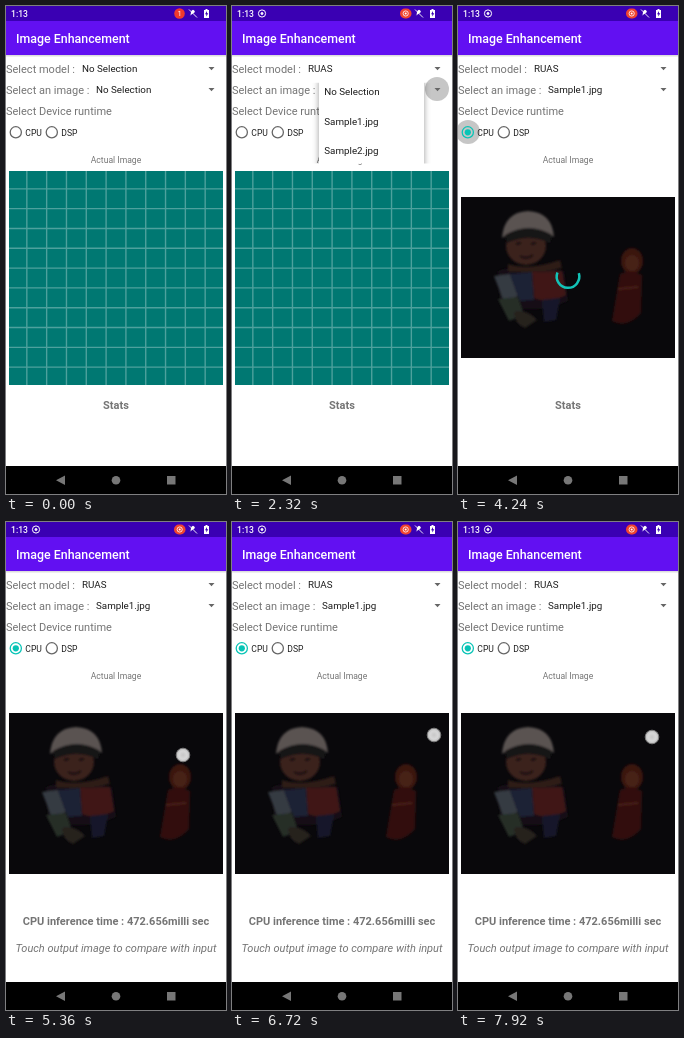
An HTML page that plays this animation: 220x488 px, repeating every 8000 ms.

```html
<!DOCTYPE html>
<html lang="en">
<head>
<meta charset="utf-8">
<title>Image Enhancement</title>
<style>
html, body { margin: 0; width: 100%; height: 100%; overflow: hidden; background: #fff }
svg { display: block; width: 220px; height: 488px; font-family: Roboto, sans-serif }
.label { font-size: 11px; fill: #757575 }
.item { font-size: 9.8px; fill: #1c1c1c }
.small { font-size: 8.6px }
.mid { text-anchor: middle }
.bold { font-weight: 700 }
.menu rect { fill: #fff; filter: drop-shadow(0 2px 3px #0006) }
</style>
</head>
<body>
<svg viewBox="0 0 220 488">
  <defs>
    <radialGradient id="glow">
      <stop offset="0" stop-color="#ddd"/><stop offset=".6" stop-color="#eee"/>
      <stop offset="1" stop-color="#ccc"/>
    </radialGradient>
    <clipPath id="frame"><rect x="3" y="191" width="214" height="161"/></clipPath>
    <clipPath id="reveal"><rect id="revealBox" x="70" width="140"/></clipPath>
    <filter id="soft"><feGaussianBlur stdDeviation="1"/></filter>
  </defs>
  <rect width="220" height="488" fill="#fff"/>

  <!-- App and status bars -->
  <rect y="49" width="220" height="1.5" fill="#0002"/>
  <rect y="14" width="220" height="35" fill="#6210f2"/>
  <rect width="220" height="15" fill="#3a00b3"/>
  <g fill="#fff">
    <text x="5" y="11" font-size="8.6" font-weight="500">1:13</text>
    <text x="10" y="36.5" font-size="12.4" font-weight="500">Image Enhancement</text>
    <path d="M183.5 10q1.5-1 1.5-4 .5-2 2-2.2 1.500.2 2 2.200 3 1.500 4zM186 10.500h2v1h-2z"/>
    <path d="M183 3.500l8 8" stroke="#fff" stroke-width=".9"/>
    <path d="M199.500 3h2v1h1.500v8h-5v-8h1.500z"/>
    <path d="M201 5l-2 3.200h1.300v2.300l2-3.300h-1.300z" fill="#3a00b3"/>
  </g>
  <g id="notice">
    <circle cx="173.500" cy="7.500" r="5.300" fill="#f0392c"/>
    <text class="mid" x="173.500" y="10.200" font-size="7.500" fill="#fff">1</text>
  </g>
  <g id="recording">
    <rect x="168" y="2.500" width="11.500" height="10" rx="5" fill="#f0442f"/>
    <circle cx="173.700" cy="7.500" r="2.600" fill="none" stroke="#fff" stroke-width=".8"/>
    <circle cx="173.700" cy="7.500" r="1" fill="#fff"/>
  </g>
  <g id="capture" fill="none" stroke="#fff">
    <circle cx="30" cy="7.500" r="3.600"/><circle cx="30" cy="7.500" r="1" fill="#fff"/>
  </g>

  <!-- Form -->
  <g class="label">
    <text x="0" y="66.500">Select model :</text>
    <text x="0" y="87.500">Select an image :</text>
    <text x="0" y="108.500">Select Device runtime</text>
  </g>
  <circle id="ripple" fill="#777"/>
  <text id="model" class="item" x="76" y="66"></text>
  <text id="image" class="item" x="90" y="87"></text>
  <path d="M202.500 61h6l-3 3.200zM202.500 82h6l-3 3.200z" fill="#666"/>
  <g fill="none" stroke="#666" stroke-width="1.300">
    <circle id="cpu" cx="9.800" cy="126.300" r="5.600"/><circle cx="45.800" cy="126.300" r="5.600"/>
  </g>
  <circle id="cpuDot" cx="9.800" cy="126.300" r="3.100" fill="#08c4b6"/>
  <g class="small" fill="#1c1c1c"><text x="19.300" y="129.600">CPU</text><text x="55.300" y="129.600">DSP</text></g>
  <text id="caption" class="small mid" x="110" y="156.700" fill="#757575"></text>

  <!-- Placeholder grid -->
  <g id="grid">
    <rect x="3" y="165" width="214" height="214" fill="#007872"/>
    <path id="lines" transform="translate(3 165) scale(1.9815)" fill="none" stroke="#fff" stroke-opacity=".3" stroke-width=".7"/>
  </g>

  <!-- Low-light picture -->
  <g id="photo" clip-path="url(#frame)">
    <rect x="3" y="191" width="214" height="161" fill="#09080b"/>
    <g filter="url(#soft)">
      <path d="M40 265q20-8 66 0l4 30q-30 14-68 4z" fill="#151114"/>
      <ellipse cx="68" cy="240" rx="20" ry="19" fill="#3a211b"/>
      <path d="M44 232q2-26 26-27 24 1 26 26-10-8-25-8-16 0-27 9z" fill="#5a5351"/>
      <path d="M47 229q24-14 47 0l-2 8q-22-10-43 0z" fill="#191518"/>
      <path d="M58 238l5-1M73 238l5-1M62 250q7 4 13-1" stroke="#140c0d" stroke-width="2" fill="none"/>
      <path d="M50 258q20 7 52-4l2 8q-26 6-54 3z" fill="#2e1c18"/>
      <path d="M74 266l30-1 4 24q-18 9-32 3z" fill="#3f1418"/>
      <path d="M36 270l16-2 8 22-14 6z" fill="#363a43"/>
      <path d="M52 268l22-2 2 28-14 1z" fill="#1b2135"/>
      <path d="M40 293l20-2 6 18-15 6z" fill="#252f28"/>
      <path d="M56 306q14-3 23 8l-12 8q-10-3-11-16z" fill="#27211f"/>
      <path d="M84 294l18-2-4 22-12 2z" fill="#18192a"/>
      <ellipse cx="174" cy="255" rx="11" ry="13" fill="#3a1211"/>
      <ellipse cx="174" cy="257" rx="7" ry="8" fill="#472319"/>
      <path d="M162 268q11-5 22 1l-1 38q-14 16-29 8z" fill="#32100f"/>
      <path d="M160 283l20-2" stroke="#4a2116" stroke-width="2"/>
    </g>
  </g>
  <path id="spinner" fill="none" stroke="#12c3b7" stroke-width="2.500"/>

  <text id="stats" class="label bold mid" x="110" y="403"></text>
  <text id="hint" class="label mid" x="110" y="430" font-style="italic">Touch output image to compare with input</text>

  <g clip-path="url(#reveal)"><g id="models" class="menu"></g><g id="images" class="menu"></g></g>
  <circle id="touch" r="6.800" fill="url(#glow)" stroke="#8a8a8a"/>

  <!-- Navigation bar -->
  <rect y="460" width="220" height="28" fill="#000"/>
  <path d="M59 469.500v9.500l-9-4.700zM161 470h8.500v8.500h-8.500z" fill="#777"/>
  <circle cx="110" cy="474.300" r="4.300" fill="#777"/>
</svg>
<script>
const $ = id => document.getElementById(id);
const set = (id, attrs) => { for (const k in attrs) $(id).setAttribute(k, attrs[k]); };
const show = (id, on) => set(id, { display: on ? 'inline' : 'none' });
const within = (t, a, b) => t >= a && t < b;
const ramp = (t, a, b) => Math.min(1, Math.max(0, (t - a) / (b - a)));

const ROW = 29.35;
function menu(id, x, y, w, names) {
  $(id).innerHTML = `<rect x="${x}" y="${y}" width="${w}" height="${ROW * names.length}" rx="1"/>` +
    names.map((n, i) => `<text class="item" x="${x + 5.3}" y="${y + 18.3 + i * ROW}">${n}</text>`).join('');
}
menu('models', 71, 55, 120, ['No Selection', 'RUAS', 'SCI', 'StableLLVE', 'ZeroDCE']);
menu('images', 87, 71, 105, ['No Selection', 'Sample1.jpg', 'Sample2.jpg', 'Sample3.jpg', 'Sample4.jpg']);

let d = '';
for (let i = 9; i < 108; i += 10) d += `M${i} 0V108M0 ${i}H108`;
for (let i = 29; i < 80; i += 10) d += `M${i} 19V89M19 ${i}H89`;
$('lines').setAttribute('d', d);

// Each tap: start, end, x, y
const taps = [
  [640, 800, 205, 62], [1280, 1440, 133.5, 95], [2080, 2240, 205, 83], [2720, 2880, 133, 115],
  [3920, 4080, 10, 126], [5360, 5840, 177, 233], [6400, 7040, 202, 213], [7520, 8001, 194, 215]
];
// Each ripple: start, end, x, y
const ripples = [[640, 960, 205, 62], [2080, 2480, 205, 83], [3920, 4560, 10, 126]];
// Each menu: id, open, close, anchor, top
const menus = [['models', 760, 1520, 63, 55], ['images', 2200, 2960, 84, 71]];

const DONE = 4560, PICKED = 2960;

function draw(t) {
  show('notice', t < 480);
  show('recording', t >= 480);
  show('capture', t >= 480);

  $('model').textContent = t < 1520 ? 'No Selection' : 'RUAS';
  $('image').textContent = t < PICKED ? 'No Selection' : 'Sample1.jpg';
  const cpu = t >= 4000, done = t >= DONE;
  set('cpu', { stroke: cpu ? '#08c4b6' : '#666' });
  show('cpuDot', cpu);

  const pressed = taps.slice(5).some(([a, b]) => within(t, a, b));
  const enhanced = done && !pressed;
  $('caption').textContent = enhanced ? 'Enhanced Image' : 'Actual Image';
  show('grid', t < PICKED);
  show('photo', t >= PICKED);
  $('photo').style.filter = enhanced ? 'brightness(2.6)' : 'none';
  $('stats').textContent = done ? 'CPU inference time : 472.656milli sec' : 'Stats';
  show('hint', done);

  show('spinner', cpu && !done);
  const start = -0.3 + (t - 4240) / 210, end = start + 3.8 + Math.sin((t - 4240) / 210);
  const point = a => `${110 + 11.3 * Math.cos(a)} ${270.5 + 11.3 * Math.sin(a)}`;
  set('spinner', { d: `M${point(start)}A11.3 11.3 0 ${end - start > Math.PI ? 1 : 0} 1 ${point(end)}` });

  const wave = ripples.find(([a, b]) => within(t, a, b));
  show('ripple', wave);
  if (wave) {
    const [a, b, x, y] = wave;
    set('ripple', { cx: x, cy: y, r: 12 * ramp(t, a - 60, a + 200), opacity: .42 * (1 - ramp(t, b - 120, b)) });
  }

  for (const [id, open, close, anchor, top] of menus) {
    const on = within(t, open, close);
    show(id, on);
    if (!on) continue;
    const p = ramp(t, open, open + 220);
    const y = anchor + (top - 6 * (p === 1) - anchor) * p;
    const bottom = anchor + (top + 5 * ROW + 8 * (p === 1) - anchor) * p;
    set('revealBox', { y, height: bottom - y });
    set(id, { opacity: 1 - ramp(t, close - 80, close) });
  }

  const tap = taps.find(([a, b]) => within(t, a, b));
  show('touch', tap);
  if (tap) set('touch', { cx: tap[2], cy: tap[3], opacity: tap[3] > 190 ? .9 : .65 });
}

const begin = performance.now();
function tick() {
  draw((performance.now() - begin) % 8000);
  requestAnimationFrame(tick);
}
tick();
</script>
</body>
</html>
```
